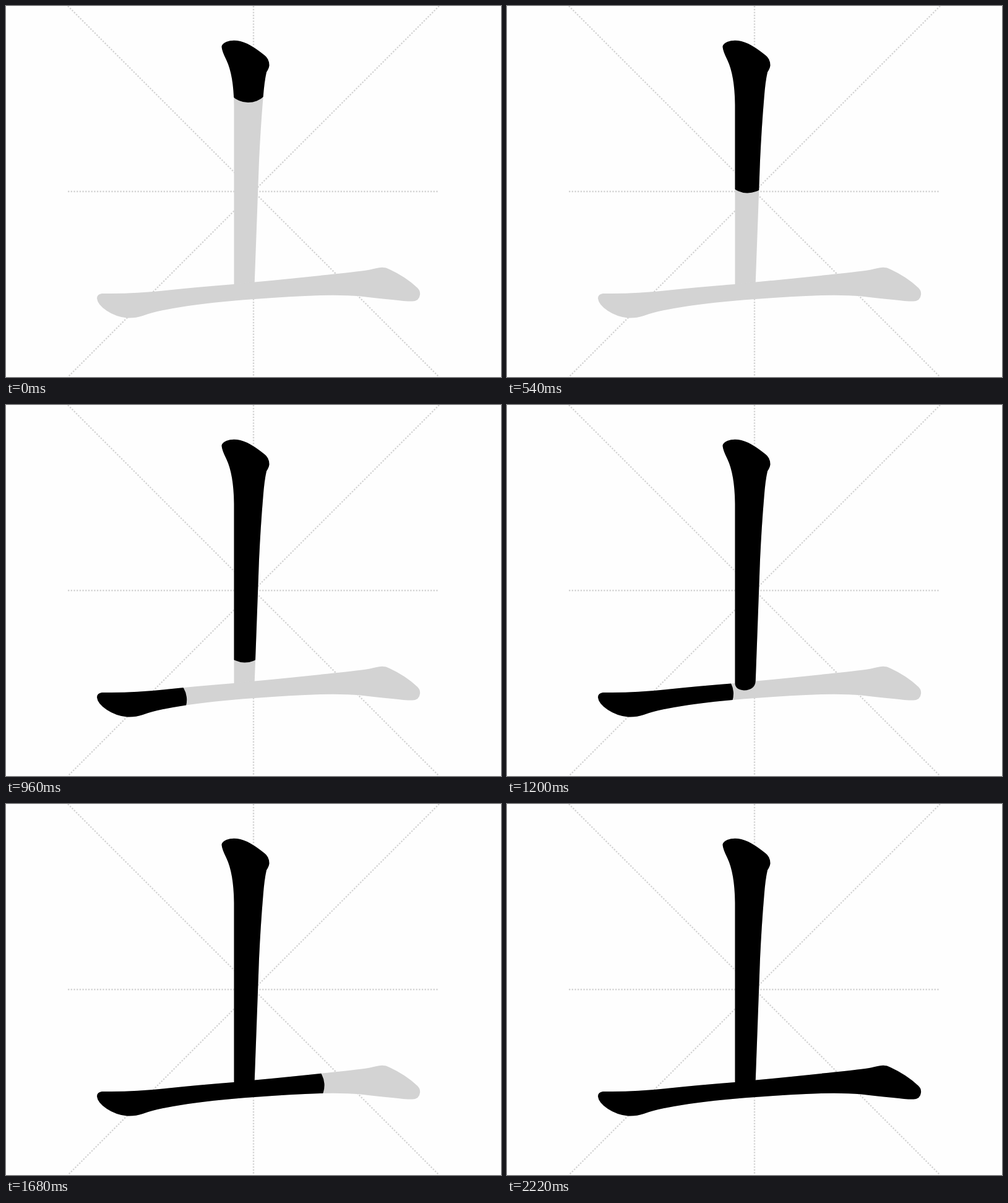
Write an HTML page that moves like this. It is 800 px wide and 600 px high and loops after 2280 ms.

```html
<!DOCTYPE html>
<html lang="en">
<head>
<meta charset="utf-8">
<title>Stroke order</title>
<style>
  html, body { margin: 0; width: 100%; height: 100%; overflow: hidden; background: #fefefe; }
  svg { display: block; width: 800px; height: 600px; }
  .pen { fill: none; stroke: #000; stroke-width: 75; stroke-linecap: round; }
</style>
</head>
<body>
<svg viewBox="0 0 800 600">
  <defs>
    <path id="down" d="M348.5 66Q349 61 356 58Q371 52.5 390 61Q402 67 417 79Q425.5 85 425.5 96Q425 101 421 107Q417.5 122 415.5 149Q411.5 196 409 250L401.8 446Q401 461 383 461.5Q368.5 460 368.5 450V160Q368 112 356 87Q349 73 348.5 66Z"/>
    <path id="across" d="M147 473Q147 466 155 465Q162 465 170 465Q213 465 258 460Q310 454.5 368 450L402 446.5Q470 440 530 433.5Q573 429 588 426.5Q599 423.5 605 423Q613 422 620 426Q646 438 664 455Q670 460 669 467Q668 477 657 477.5Q648 478 624 475Q604 473 573 469.5Q545 467 508 468Q460 469.5 402 474Q330 479 282 487Q243 493 221 501Q209 505 196 504.5Q178 503 163 493Q148 483 147 473Z"/>
    <clipPath id="clipDown"><use href="#down"/></clipPath>
    <clipPath id="clipAcross"><use href="#across"/></clipPath>
  </defs>
  <g stroke="#d3d3d3" stroke-dasharray="1 1" transform="translate(100) scale(2.34375)">
    <path d="M0 0L256 256"/>
    <path d="M256 0L0 256"/>
    <path d="M128 0V256"/>
    <path d="M0 128H256"/>
  </g>
  <g fill="#d3d3d3">
    <use href="#down"/>
    <use href="#across"/>
  </g>
  <g clip-path="url(#clipDown)">
    <path class="pen" id="penDown" d="M360 68L390 95L391.5 118.5L390 216L387.5 313.5L386 379V440"/>
  </g>
  <g clip-path="url(#clipAcross)">
    <path class="pen" id="penAcross" d="M155 470L180.5 484L254.6 477L328.5 467L477.3 455L595 447L621 461L650 475"/>
  </g>
</svg>
<script>
const LOOP = 2280, STEP = 60;
const penDown = document.getElementById('penDown');
const penAcross = document.getElementById('penAcross');

// Shows the first part of a pen path, with a round tip.
function draw(pen, length) {
  pen.style.visibility = length > 0 ? 'visible' : 'hidden';
  pen.setAttribute('stroke-dasharray', `${Math.max(length, 0)} 2000`);
}

const start = performance.now();
function frame(now) {
  const elapsed = Math.max(0, now - start) % LOOP;
  const t = Math.floor(elapsed / STEP) * STEP;
  draw(penDown, 64 + 0.2713 * t);
  draw(penAcross, 29.1 + 0.3105 * (t - 720));
  requestAnimationFrame(frame);
}
frame(start);
</script>
</body>
</html>
```
